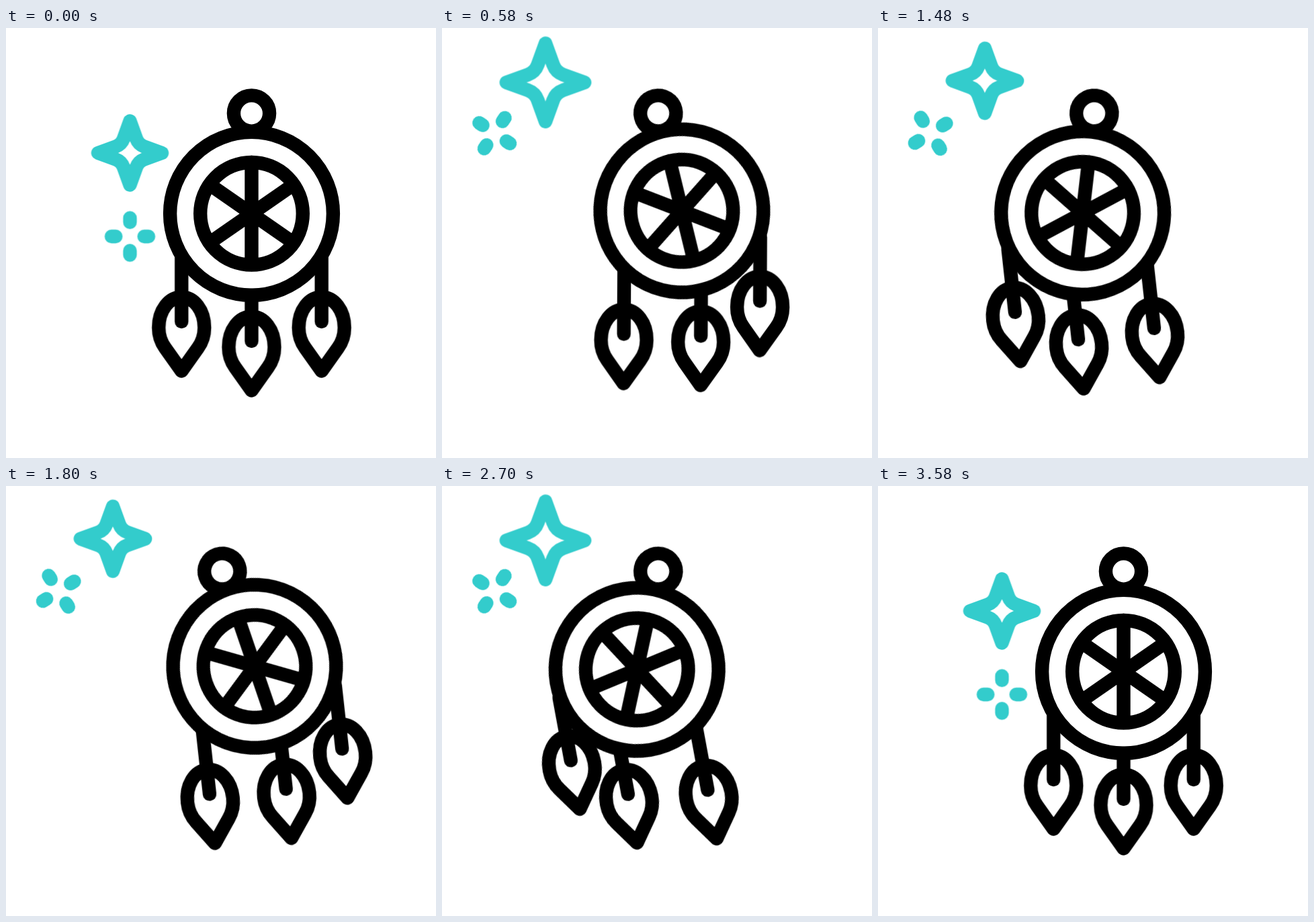
Write an HTML page without scripts that moves like this. It is 640x640 px and loops after 3600 ms.

```html
<!DOCTYPE html>
<html lang="en">
<head>
<meta charset="utf-8">
<title>Dreamcatcher</title>
<style>
html, body { margin: 0; width: 100%; height: 100%; overflow: hidden; background: #fff; }
svg { display: block; width: 100vw; height: 100vh; }
.line { fill: none; stroke: #000; stroke-width: 20.4; stroke-linecap: round; stroke-linejoin: round; }
.teal { stroke: #33cccc; }

.shift, .swing, .feather, .star, .drift, .spin {
  animation: 3.6s cubic-bezier(.33, 0, .67, 1) infinite;
}
.shift { animation-name: shift; }
.swing { animation-name: swing; transform-origin: 365.5px 127px; }
.feather { animation-name: feather; }
.star { animation-name: star; vector-effect: non-scaling-stroke; }
.drift { animation-name: drift; }
.spin { animation-name: spin; animation-timing-function: cubic-bezier(.33, .167, .67, .833); }

@keyframes shift {
  0%, 90%, 100% { transform: translateX(0); }
  15%, 75% { transform: translateX(-43.7px); }
}
@keyframes swing {
  0%, 99.4%, 100% { transform: rotate(0deg); }
  15% { transform: rotate(-14deg); }
  34% { transform: rotate(21.2deg); }
  51.8% { transform: rotate(-20deg); }
  75% { transform: rotate(12.2deg); }
  93.9% { transform: rotate(-4.5deg); }
}
/* The feathers counter the swing, a little late. */
@keyframes feather {
  0%, 99.4%, 100% { transform: rotate(0deg); }
  16.7% { transform: rotate(14deg); }
  34.9% { transform: rotate(-22deg); }
  56% { transform: rotate(21deg); }
  75.3% { transform: rotate(-22.7deg); }
  95% { transform: rotate(4deg); }
}
@keyframes star {
  0%, 90%, 100% { transform: translate(184.5px, 186px) scale(1); }
  15.56%, 75.56% { transform: translate(154px, 81px) scale(1.225); }
  45.56% { transform: translate(159.3px, 78.3px) scale(1); }
}
@keyframes drift {
  0%, 90%, 100% { transform: translate(184.5px, 310.3px); }
  15.56%, 75.56% { transform: translate(78.2px, 156.6px); }
}
@keyframes spin {
  0%, 90%, 100% { transform: rotate(0deg); }
  15.56%, 75.56% { transform: rotate(31.5deg); }
  45.56% { transform: rotate(262deg); }
}
</style>
</head>
<body>
<svg viewBox="0 0 640 640">
  <defs>
    <path id="leaf" d="M0 73.5L-24.5 39C-31 30-34 20-34 9C-34-17-18.5-36.5 0-36.5S34-17 34 9C34 20 31 30 24.5 39Z"/>
    <g id="side">
      <path d="M0 0V95"/>
      <use href="#leaf" y="95"/>
    </g>
  </defs>

  <g class="line shift">
    <g class="swing">
      <circle cx="365.5" cy="127" r="26.6"/>
      <circle cx="365.5" cy="276.3" r="121.4"/>
      <circle cx="365.5" cy="276.3" r="76.3"/>
      <path d="M365.5 200V352M303.5 233.3L427.5 319.3M427.5 233.3L303.5 319.3"/>
      <g transform="translate(261.3 342)"><use class="feather" href="#side"/></g>
      <g transform="translate(469.7 342)"><use class="feather" href="#side"/></g>
      <g transform="translate(365.5 398)">
        <g class="feather">
          <path d="M0 0V68"/>
          <use href="#leaf" y="68"/>
        </g>
      </g>
    </g>
  </g>

  <path class="line teal star" d="M0-47.5L9.4-21.5C11.4-16 16-11.4 21.5-9.4L47.5 0L21.5 9.4C16 11.4 11.4 16 9.4 21.5L0 47.5L-9.4 21.5C-11.4 16-16 11.4-21.5 9.4L-47.5 0L-21.5-9.4C-16-11.4-11.4-16-9.4-21.5Z"/>
  <g class="drift">
    <path class="line teal spin" d="M0-27.5V-21.2M0 21.2V27.5M-27.5 0H-21.2M21.2 0H27.5"/>
  </g>
</svg>
</body>
</html>
```
